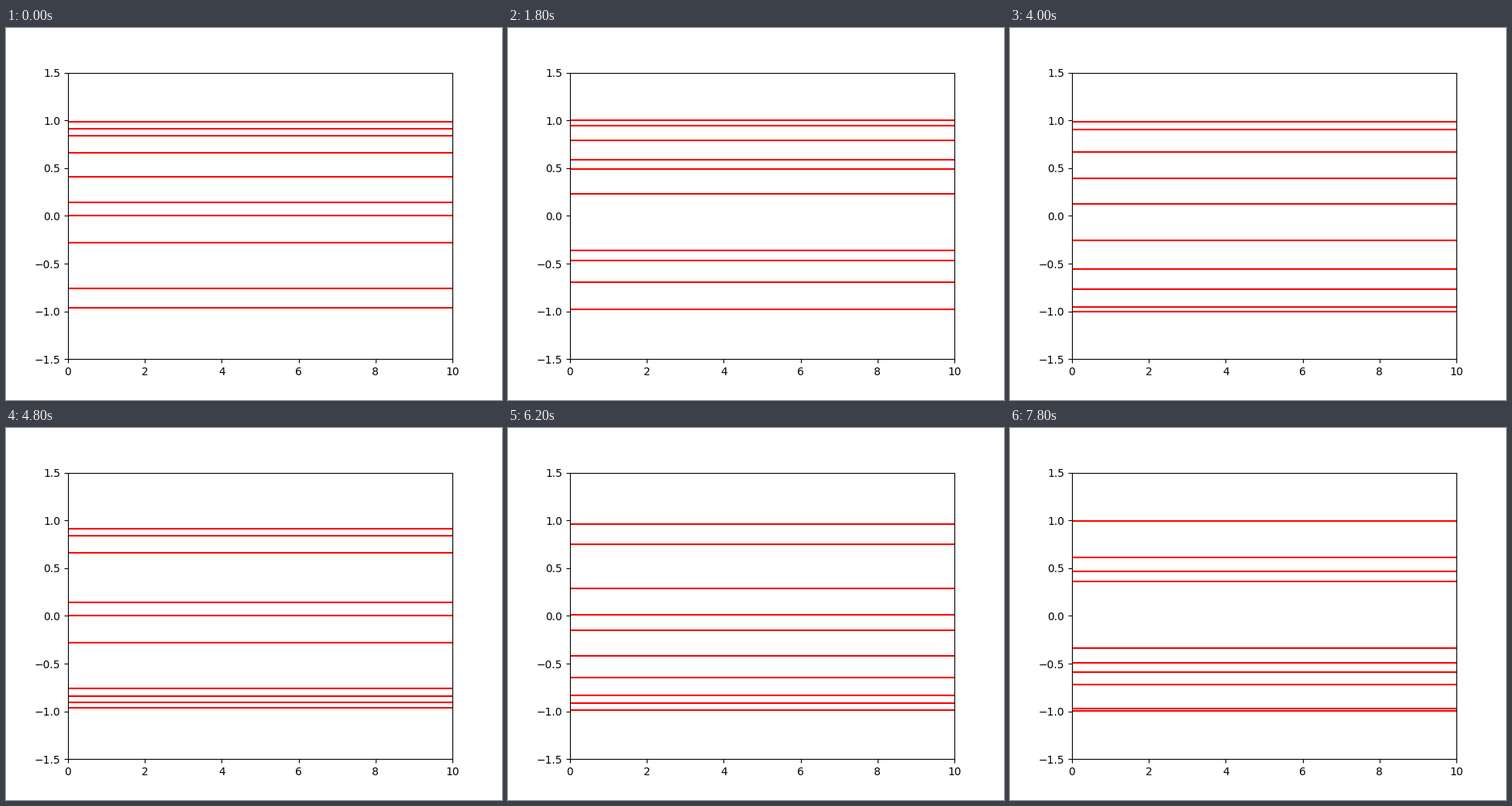
Recreate the animation shown at these times as a matplotlib script. Size 640 px wide and 480 px high, loop 8000 ms.

```python
import numpy as np
import matplotlib.pyplot as plt
from matplotlib.animation import FuncAnimation

FRAMES = 40
INTERVAL = 200
COUNT = 10

x = np.linspace(0, 10, 100)

fig, ax = plt.subplots(figsize=(6.4, 4.8), dpi=100)
ax.set_xlim(0, 10)
ax.set_ylim(-1.5, 1.5)
lines = [ax.plot([], [], color="red", lw=1.5)[0] for _ in range(COUNT)]


def update(n):
    # Each level follows the same sine wave, one radian apart.
    for k, line in enumerate(lines):
        line.set_data(x, np.full_like(x, np.sin(x[n] + k)))
    return lines


anim = FuncAnimation(fig, update, frames=FRAMES, interval=INTERVAL,
                     init_func=lambda: update(0), repeat=True,
                     repeat_delay=0, blit=False)
plt.show()
```
